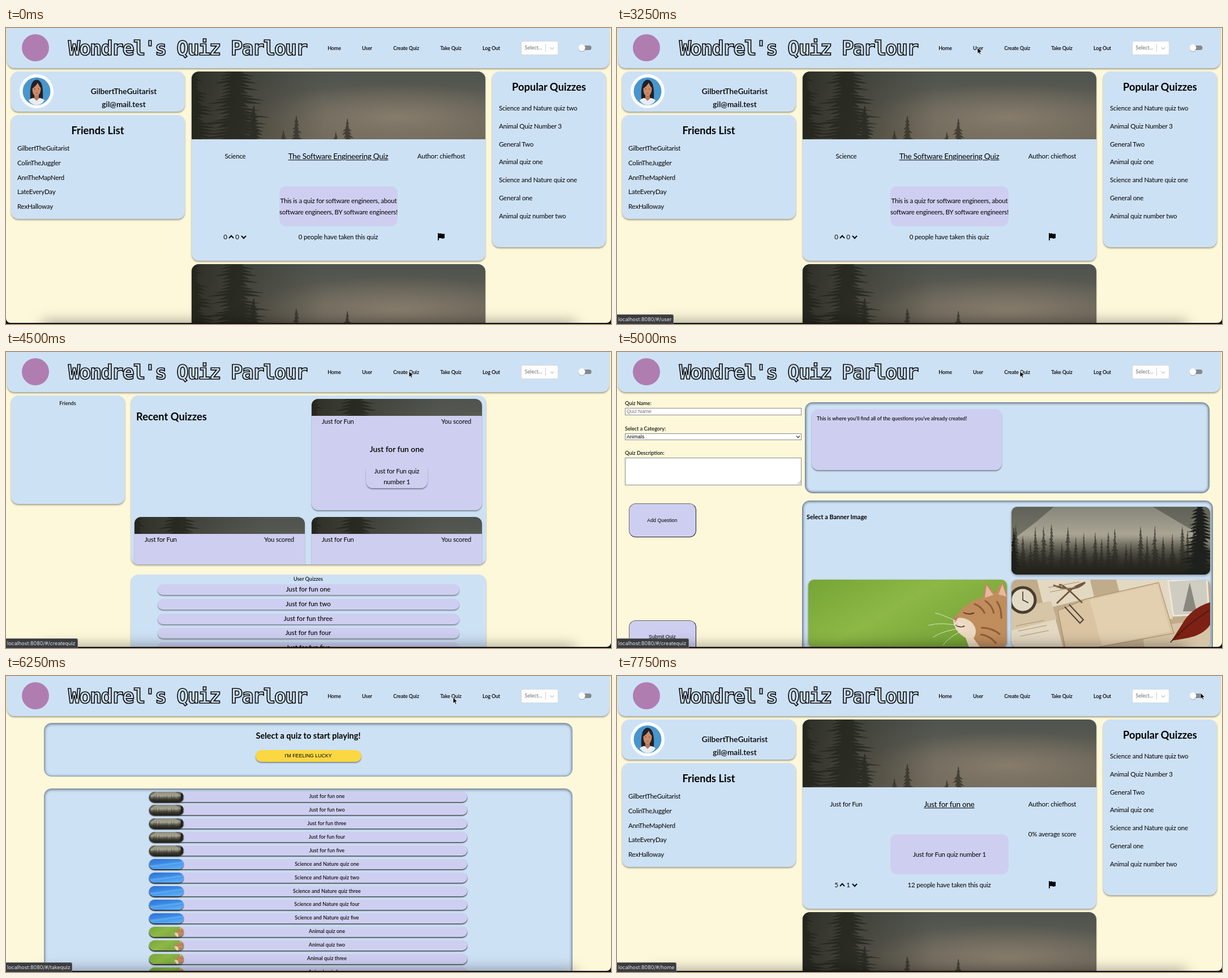
An HTML page that plays this animation: 1069 px wide and 524 px high, repeating every 8 s.

```html
<!DOCTYPE html>
<html lang="en">
<head>
<meta charset="utf-8">
<title>Quiz site tour</title>
<style>
html, body { margin: 0; width: 100%; height: 100%; overflow: hidden; background: #111; }
#stage { position: relative; width: 1069px; height: 524px; overflow: hidden; background: #111; font-family: Lato, "Open Sans", sans-serif; color: #000; }
#paper { position: absolute; inset: 0 0 2px; overflow: hidden; background: #fdf8da; border-radius: 0 0 8px 8px; }
.page { position: absolute; inset: 0; }
.box { position: absolute; box-sizing: border-box; overflow: hidden; }
.card { background: #cde1f5; border-radius: 13px; box-shadow: 0 2px 3px rgba(0,0,0,.36); }
.lilac { background: #cecff0; border-radius: 12px; }
.lift { box-shadow: 0 2px 2px rgba(0,0,0,.38); }
.well { background: #cde1f5; border: 1px solid #75828f; border-radius: 13px; box-shadow: inset 0 0 4px 1px rgba(20,35,50,.6); }
.soft { border-color: #8d9aa8; box-shadow: inset 0 1px 5px rgba(20,35,50,.65); }
.pill { border-radius: 10px; }
.row { box-shadow: 0 1.5px 2px rgba(0,0,0,.75); }
.round { border-radius: 11px; }
.photo { border-radius: 10px; box-shadow: 0 2px 4px rgba(0,0,0,.35); }
.field { background: #fff; border: 1px solid #8a8a8a; }
.button { border: 1.5px solid; border-color: #666 #222 #222 #666; border-radius: 12px; background: #cecff0; }
.t { position: absolute; white-space: pre; line-height: 1; transform: translate(-50%, -50%); font-size: 11.5px; font-weight: 400; letter-spacing: -.018em; }
.l { transform: translate(0, -50%); }
.r { transform: translate(-100%, -50%); }
.h { font-size: 18.3px; font-weight: 700; letter-spacing: 0; }
.nav { font-size: 9px; font-weight: 600; letter-spacing: -.015em; }
.label { font-size: 9.1px; font-weight: 500; letter-spacing: 0; }
.mid { font-size: 13.8px; font-weight: 600; letter-spacing: 0; }
.item { font-size: 11.4px; font-weight: 500; letter-spacing: 0; }
.link { font-size: 13.5px; text-decoration: underline; text-decoration-thickness: 1px; }
.ui { font: 8.8px/1 "Liberation Sans", Arial, sans-serif; letter-spacing: 0; }
.gray { color: #757575; }
.brand { font: bold 35px/1 "DejaVu Sans Mono", monospace; letter-spacing: -1.92px; color: #cde1f5; -webkit-text-stroke: 1.7px #111; }
.status { left: 0; top: 507px; height: 17px; padding-left: 2px; font: 9px/16px Inter, sans-serif; color: #e4e5e7; background: #3b3c3f; border: solid #606164; border-width: 1px 1px 0 0; border-radius: 0 3px 0 0; white-space: pre; }
.glow { left: 70px; top: 526px; width: 930px; height: 20px; overflow: visible; box-shadow: 0 0 24px 6px rgba(0,0,0,.36); }
.page, .status, #cursor { animation: 8s step-end infinite; }

.homeA { animation-name: homeA; }
.user { animation-name: user; }
.create { animation-name: create; }
.take { animation-name: take; }
.homeB { animation-name: homeB; }
@keyframes homeA { 0% { visibility: visible } 43.75%, 100% { visibility: hidden } }
@keyframes user { 0% { visibility: hidden } 43.75% { visibility: visible } 62.5%, 100% { visibility: hidden } }
@keyframes create { 0% { visibility: hidden } 62.5% { visibility: visible } 78.125%, 100% { visibility: hidden } }
@keyframes take { 0% { visibility: hidden } 78.125% { visibility: visible } 90.625%, 100% { visibility: hidden } }
@keyframes homeB { 0% { visibility: hidden } 90.625%, 100% { visibility: visible } }

.toHome { animation-name: toHome; }
.toUser { animation-name: toUser; }
.toCreate { animation-name: toCreate; }
.toTake { animation-name: toTake; }
@keyframes toHome { 0% { visibility: hidden } 21.875% { visibility: visible } 31.25% { visibility: hidden } 87.5%, 100% { visibility: visible } }
@keyframes toUser { 0% { visibility: hidden } 37.5% { visibility: visible } 53.125%, 100% { visibility: hidden } }
@keyframes toCreate { 0% { visibility: hidden } 53.125% { visibility: visible } 65.625%, 100% { visibility: hidden } }
@keyframes toTake { 0% { visibility: hidden } 65.625% { visibility: visible } 84.375%, 100% { visibility: hidden } }

#cursor { position: absolute; left: -1px; top: -1px; animation-name: point; }
@keyframes point {
  0% { transform: translate(1080px, 530px) }
  3.125% { transform: translate(860px, 440px) }
  6.25% { transform: translate(715px, 230px) }
  9.375% { transform: translate(610px, 85px) }
  12.5% { transform: translate(584px, 48px) }
  18.75% { transform: translate(578px, 36px) }
  34.375% { transform: translate(602px, 38px) }
  37.5% { transform: translate(630px, 36px) }
  40.625% { transform: translate(637px, 35px) }
  50% { transform: translate(660px, 37px) }
  53.125% { transform: translate(696px, 36px) }
  56.25% { transform: translate(712px, 34px) }
  65.625% { transform: translate(765px, 37px) }
  68.75% { transform: translate(790px, 38px) }
  81.25% { transform: translate(735px, 39px) }
  84.375% { transform: translate(620px, 38px) }
  87.5% { transform: translate(575px, 36px) }
  93.75% { transform: translate(820px, 28px) }
  96.875%, 100% { transform: translate(1031px, 30px) }
}
</style>
</head>
<body>
<svg width="0" height="0" style="position:absolute">
  <defs>
    <linearGradient id="mist" x2="0" y2="1"><stop stop-color="#4e534e"/><stop offset="1" stop-color="#6f6759"/></linearGradient>
    <radialGradient id="fog" cx=".7" cy=".68" r=".5"><stop stop-color="#877c6c"/><stop offset="1" stop-color="#877c6c" stop-opacity="0"/></radialGradient>
    <linearGradient id="dusk"><stop stop-color="#2b2b23" stop-opacity=".9"/><stop offset=".45" stop-color="#3a3a31" stop-opacity="0"/></linearGradient>
    <linearGradient id="dawn" x2="0" y2="1"><stop stop-color="#85867a"/><stop offset=".4" stop-color="#a9a493"/><stop offset="1" stop-color="#2a2a22"/></linearGradient>
    <linearGradient id="floor" x2="0" y2="1"><stop offset=".45" stop-color="#22221b" stop-opacity="0"/><stop offset="1" stop-color="#22221b"/></linearGradient>
    <linearGradient id="azure" x2=".5" y2="1"><stop stop-color="#2f6fd0"/><stop offset=".5" stop-color="#3c8be6"/><stop offset="1" stop-color="#58aaf4"/></linearGradient>
    <linearGradient id="grass" y2=".6"><stop stop-color="#75a536"/><stop offset=".5" stop-color="#8db846"/><stop offset="1" stop-color="#75a338"/></linearGradient>
  </defs>
  <symbol id="banner" viewBox="0 0 519 120" preserveAspectRatio="xMidYMid slice">
    <path fill="url(#mist)" d="M0 0h519v120H0z"/><path fill="url(#fog)" d="M0 0h519v120H0z"/><path fill="url(#dusk)" d="M0 0h519v120H0z"/>
    <g id="nearTrees" fill="#22241c" opacity=".75"/><g id="youngTrees" fill="#35342a" opacity=".8"/>
  </symbol>
  <symbol id="forest" viewBox="0 0 351 120" preserveAspectRatio="xMidYMid slice">
    <path fill="url(#dawn)" d="M0 0h351v120H0z"/><path fill="#33362f" opacity=".45" d="M0 0H75L42 28 0 60zM351 0H250L300 30 351 60z"/>
    <g id="farTrees" fill="#38392f" opacity=".8"/><path fill="url(#floor)" d="M0 0h351v120H0z"/>
    <g id="sideTrees" fill="#1d201d"/>
  </symbol>
  <symbol id="sky" viewBox="0 0 61 18" preserveAspectRatio="xMidYMid slice">
    <path fill="url(#azure)" d="M0 0h61v18H0z"/><path fill="#75b8f4" opacity=".45" d="M0 12 61 4v3L0 16z"/>
  </symbol>
  <symbol id="cat" viewBox="0 0 351 120" preserveAspectRatio="xMidYMid slice">
    <path fill="url(#grass)" d="M0 0h351v120H0z"/>
    <path fill="#c08d5d" d="M351 25 342 2 330 24 313 4 309 31Q280 38 263 62L256 72Q258 90 279 103L285 120H351z"/>
    <path fill="#e6b9a0" d="M315 10 327 27 312 32zM343 8 350 30 336 26z"/>
    <path fill="#ecd9c1" d="M256 72Q270 62 287 74 302 88 292 104L304 120H284L278 103Q258 92 256 72z"/>
    <path fill="none" stroke="#8d5c35" stroke-width="3" d="M293 43q13 4 19 17M312 37q13 8 16 23M305 85q20 0 34 12M304 97q17 2 28 16M333 38q9 14 8 31"/>
    <path fill="none" stroke="#5b3a24" stroke-width="2" d="M274 58q9 5 19 1M260 80q8 6 16 2"/>
    <path fill="#c7786c" d="M255 67 265 66 260 76z"/>
    <path fill="none" stroke="#f4f1e4" stroke-width=".8" d="M273 83Q235 74 212 81M274 86Q240 89 220 102M275 89Q248 101 238 116M276 81Q240 62 224 59"/>
  </symbol>
  <symbol id="desk" viewBox="0 0 351 120" preserveAspectRatio="xMidYMid slice">
    <path fill="#c0ab8b" d="M0 0h351v120H0z"/>
    <path fill="#e3d8c2" d="M45 0 138-4 146 30 58 52zM-5 75 75 60 92 122H-5zM185 0 278-4 285 70 200 60z"/>
    <path fill="#d6c5a6" d="M0 50 70 38 80 70 0 90zM230 85 351 70V120H235z"/>
    <path fill="#dac4a2" stroke="#a48a65" d="M82 55 133 34 260 5 287 95 150 120H95z"/>
    <path fill="#e3d0b1" d="M138 36 258 8 281 92 160 117z"/>
    <path fill="#cfccc2" stroke="#eee7d7" stroke-width="3" d="M277 2 345-2 349 61 286 64z"/>
    <path fill="#8a877e" d="M315 5 327 56H303z"/>
    <circle cx="20" cy="36" r="22" fill="#e3dac5" stroke="#4a3c2e" stroke-width="5"/>
    <path fill="none" stroke="#352d25" stroke-width="1.5" d="M20 21V36L30 41"/>
    <path fill="none" stroke="#735a3d" stroke-width="3" d="M74 10Q112 24 130 5 110 12 103 20L80 42M103 20 125 41M88 16Q78 0 103 20"/>
    <path fill="none" stroke="#4d4237" stroke-width="2" d="M94 48 121 77 127 71 102 44"/>
    <path fill="none" stroke="#a99170" d="M8 82l50-10M12 91l50-10M16 100l50-10M65 14l55-10M68 22l45-9"/>
    <path fill="#7d2114" d="M351 40Q318 50 302 78L283 108 302 105Q338 100 351 80z"/>
    <path fill="none" stroke="#431b12" stroke-width="1.5" d="M281 111Q307 82 350 54"/>
  </symbol>
</svg>
<div id="stage"></div>
<script>
const box = (x, y, w, h, cls, inner = '') =>
  `<div class="box ${cls}" style="left:${x}px;top:${y}px;width:${w}px;height:${h}px">${inner}</div>`;
const text = (x, y, s, cls = '') => `<span class="t ${cls}" style="left:${x}px;top:${y}px">${s}</span>`;
const list = (x, y, step, items, cls) => items.map((s, i) => text(x, y + i * step, s, cls)).join('');
const draw = (x, y, w, h, inner, cls = '') =>
  `<svg class="box ${cls}" style="left:${x}px;top:${y}px" width="${w}" height="${h}">${inner}</svg>`;
const photo = (x, y, w, h, id, cls) => draw(x, y, w, h, `<use href="#${id}" width="${w}" height="${h}"/>`, cls);
const page = (name, ...parts) => `<div class="page ${name}">${parts.join('')}</div>`;
const chevron = (x, y, w, h, color, width) =>
  draw(x - 6, y - 6, 12, 12, `<path fill="none" stroke="${color}" stroke-width="${width}" d="M${6 - w} ${6 - h}L6 ${6 + h} ${6 + w} ${6 - h}"/>`);

let seed = 7;
const rand = () => (seed = seed * 16807 % 2147483647) / 2147483647;

// Jagged fir silhouette, widening from its top
function tree(x, top, w, h) {
  const n = Math.max(7, Math.round(h / 6)), right = [], left = [];
  for (let i = 1; i <= n; i++) {
    const y = top + h * i / n, a = w * i / n * (.4 + rand() * .7), b = w * i / n * (.4 + rand() * .7);
    right.push([x + a, y], [x + a * .3, y - 1]);
    left.unshift([x - b * .3, y - 1], [x - b, y]);
  }
  return `<polygon points="${[[x, top], ...right, ...left].map(p => p.map(v => v.toFixed(1))).join(' ')}"/>`;
}
const plant = (id, trees) => document.getElementById(id).innerHTML = trees.map(a => tree(...a)).join('');
plant('nearTrees', [[78, -70, 80, 200], [3, -30, 55, 160], [110, 60, 28, 70]]);
plant('youngTrees', [[185, 78, 15, 50], [275, 82, 15, 48], [162, 104, 9, 20], [255, 107, 8, 18]]);
plant('farTrees', Array.from({ length: 24 }, (_, i) => [i * 14 + rand() * 8, 30 + rand() * 34, 15, 88]));
plant('sideTrees', [[333, -40, 48, 170], [4, 35, 16, 90]]);

const avatar = draw(24, 82, 60, 60, `
  <circle cx="30" cy="30" r="30" fill="#fff"/><circle cx="30" cy="30" r="24.5" fill="#4796cd"/>
  <path fill="#20202b" d="M19 45Q17 10 30 9.5 43 10 41 45z"/>
  <path fill="#b97855" d="M26 33h8v9q6 1 9 4-5 7-13 8.5-8-1.5-13-8.5 3-3 9-4z"/>
  <path fill="#e9edf2" d="M16 46q4-4 9-4l5 5 5-5q5 0 9 4-5 8-14 8.5-9-.5-14-8.5z"/>
  <path fill="#cc8b66" d="M22.5 22Q23 14 30 14t7.5 8Q38 37 30 38T22.5 22z"/>
  <path fill="#20202b" d="M21 26Q22 12 31 13 38 13 39 26 35 22 32 15 28 22 21 26z"/>
  <path fill="none" stroke="#53342b" d="M25.5 26h2M32.5 26h2"/><path fill="none" stroke="#a44f4a" d="M28 33q2 1.5 4 0"/>`);

const flag = draw(762, 362, 15, 15,
  '<path d="M1 1h1.7v1.2Q5 .8 7.5 2T13 2V10Q10 11.5 7.5 10.3T2.7 10.3V14H1z"/>');

function home(name, q) {
  return page(name,
    box(9, 77, 307, 71, 'card'), avatar,
    text(208, 112, 'GilbertTheGuitarist', 'mid'), text(208, 135, 'gil@mail.test', 'mid'),
    box(9, 154, 307, 184, 'card'), text(162, 181, 'Friends List', 'h'),
    list(20, 213, 25.8, ['GilbertTheGuitarist', 'ColinTheJuggler', 'AnnTheMapNerd', 'LateEveryDay', 'RexHalloway'], 'l'),
    box(328, 77, 519, 335, 'card', photo(0, 0, 519, 120, 'banner')),
    text(405, 227, q.topic), text(587, 228, q.title, 'link'), text(769, 227, 'Author: chiefhost'),
    q.score ? text(769, 280, q.score) : '',
    box(483, 280, 209, 71, 'lilac'),
    list(587.5, 315.5 - (q.about.length - 1) * 10, 20, q.about),
    text(387.5, 370, q.up), chevron(398, 369.5, 4, -2.2, '#000', 2),
    text(408.5, 370, q.down), chevron(419.5, 369.5, 4, 2.2, '#000', 2),
    text(587, 370, `${q.taken} people have taken this quiz`), flag,
    box(328, 418, 519, 335, 'card', photo(0, 0, 519, 120, 'banner')),
    box(859, 77, 201, 311, 'card'), text(959.5, 104, 'Popular Quizzes', 'h'),
    list(871, 142, 31.8, ['Science and Nature quiz two', 'Animal Quiz Number 3', 'General Two', 'Animal quiz one',
      'Science and Nature quiz one', 'General one', 'Animal quiz number two'], 'l'));
}

const count = ['one', 'two', 'three', 'four', 'five'];
const fun = count.map(n => `Just for fun ${n}`);

const recent = (x, y, n) => box(x, y, 301, 197, 'lilac lift',
  box(0, 0, 301, 30, '', photo(0, 0, 519, 120, 'banner')) +
  text(18, 40, 'Just for Fun', 'l') + text(282, 40, 'You scored', 'r') +
  text(150.5, 89, fun[n], 'mid') + box(96, 114, 109, 44, 'lilac lift') +
  box(92, 110, 117, 14, 'lilac') + list(150.5, 127.5, 19.5, ['Just for Fun quiz', `number ${n + 1}`]));

const user = page('user',
  box(9, 77, 201, 192, 'card'), text(109, 91, 'Friends', 'label'),
  box(221, 77, 627, 299, 'card', text(9, 37, 'Recent Quizzes', 'h l') + recent(319, 6, 0) + recent(6, 215, 1) + recent(319, 215, 2)),
  box(221, 394, 627, 300, 'card'), text(534, 402, 'User Quizzes', 'label'),
  ...fun.map((s, i) => box(268, 411 + i * 25.75, 533, 19, 'lilac pill lift') + text(534, 420 + i * 25.75, s, 'item')));

const create = page('create',
  text(14, 90.5, 'Quiz Name:', 'label l'), box(14, 98.5, 312, 13, 'field'), text(17, 105, 'Quiz Name', 'ui gray l'),
  text(14, 135.5, 'Select a Category:', 'label l'), box(14, 143.5, 312, 12, 'field'), text(17, 149.5, 'Animals', 'ui l'),
  chevron(320, 149.5, 3, 1.6, '#222', 1.2),
  text(14, 179, 'Quiz Description:', 'label l'), box(14, 186.5, 312, 49, 'field'),
  draw(319, 228, 6, 6, '<path stroke="#777" stroke-width=".8" d="M0 6 6 0M3 6 6 3"/>'),
  box(21, 268, 119, 60, 'button'), text(80, 298, 'Add Question', 'ui'),
  box(21, 475, 119, 60, 'button'), text(80, 504, 'Submit Quiz', 'ui'),
  box(332, 89, 715, 161, 'well'), box(344, 101, 336, 108, 'lilac lift'),
  text(353, 118, "This is where you'll find all of the questions you've already created!", 'label l'),
  box(327, 263, 726, 400, 'well'),
  `<span class="t l h" style="left:335px;top:292px;font-size:10.9px">Select a Banner Image</span>`,
  photo(697, 274, 351, 120, 'forest', 'photo'),
  photo(338, 403, 351, 120, 'cat', 'photo'), photo(697, 403, 351, 120, 'desk', 'photo'));

const rows = [
  ...fun.map(s => [s, 'forest']),
  ...count.map(n => [`Science and Nature quiz ${n}`, 'sky']),
  ...count.slice(0, 4).map(n => [`Animal quiz ${n}`, 'cat'])
];
const take = page('take',
  box(67, 83, 934, 95, 'well soft'),
  `<span class="t h" style="left:534px;top:106px;font-size:14.5px">Select a quiz to start playing!</span>`,
  `<div class="box round lift" style="left:441px;top:131px;width:187px;height:21px;background:#fbd741"></div>`,
  text(534, 141, "I'M FEELING LUCKY", 'ui'),
  box(67, 199, 934, 400, 'well soft'),
  ...rows.map(([s, id], i) => {
    const y = 204.5 + i * 23.93;
    return box(253, y, 562, 18, 'lilac pill row') + photo(253, y, 61, 18, id, 'pill row') + text(567, y + 8.5, s, 'label');
  }));

const header = box(2, -20, 1064, 91, 'card') +
  draw(27, 10, 50, 50, '<circle cx="25" cy="25" r="24" fill="#b07db1"/>') +
  text(110, 36, "Wondrel's Quiz Parlour", 'brand l') +
  text(580, 34.5, 'Home', 'nav') + text(638, 34.5, 'User', 'nav') + text(707, 34.5, 'Create Quiz', 'nav') +
  text(786, 34.5, 'Take Quiz', 'nav') + text(857.5, 34.5, 'Log Out', 'nav') +
  `<div class="box" style="left:910px;top:22.5px;width:66px;height:25px;background:#fff;border:1px solid #d2d6dc;border-radius:3px"></div>` +
  text(916.5, 35, 'Select...', 'label gray l') +
  draw(953, 28, 1, 14, '<path fill="#ccc" d="M0 0h1v14H0z"/>') + chevron(964.5, 35.5, 3.2, 1.6, '#c4c4c4', 1.3) +
  draw(1006, 24, 34, 24, `<rect x="8" y="7" width="20.5" height="8" rx="4" fill="#85898d"/>
    <circle cx="11.5" cy="12" r="6.3" fill="#000" opacity=".18"/><circle cx="11.5" cy="11" r="6" fill="#fff"/>`);

const status = (cls, path, w) => `<div class="box status ${cls}" style="width:${w}px">localhost:8080/#/${path}</div>`;

document.getElementById('stage').innerHTML = `<div id="paper">${
  home('homeA', {
    topic: 'Science', title: 'The Software Engineering Quiz', up: 0, down: 0, taken: 0,
    about: ['This is a quiz for software engineers, about', 'software engineers, BY software engineers!']
  }) + user + create + take +
  home('homeB', {
    topic: 'Just for Fun', title: fun[0], up: 5, down: 1, taken: 12,
    score: '0% average score', about: ['Just for Fun quiz number 1']
  }) + header}<div class="box glow"></div></div>` +
  status('toHome', 'home', 105) + status('toUser', 'user', 100) +
  status('toCreate', 'createquiz', 127) + status('toTake', 'takequiz', 117) +
  `<svg id="cursor" width="12" height="16"><path d="M1 1V11.5L3.5 9.2 5.2 13 7 12.2 5.4 8.5H8.8z" stroke="#fff" stroke-width=".8"/></svg>`;
</script>
</body>
</html>
```
